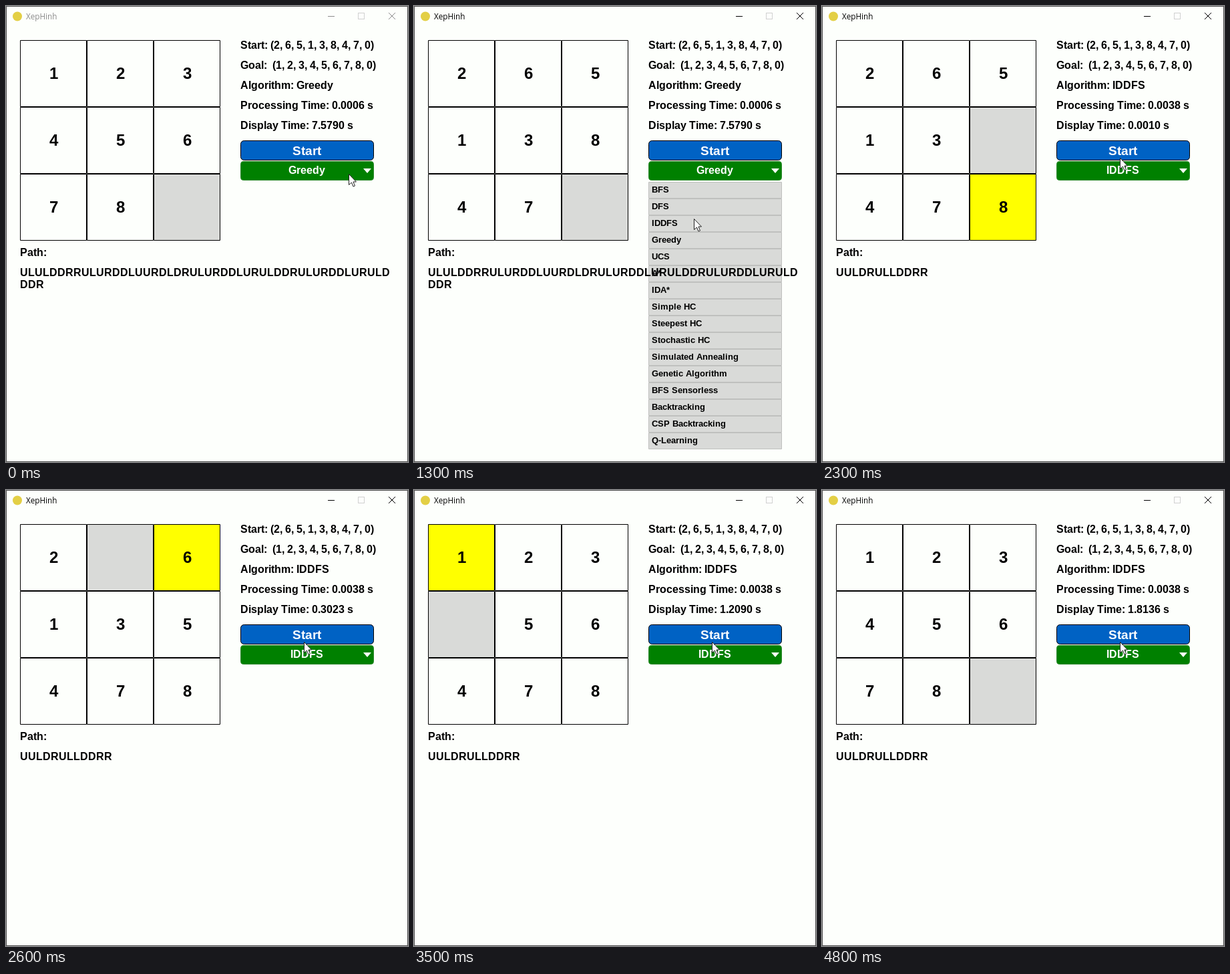
An HTML page with a canvas for the animation above (4900 ms loop, 602 px wide and 682 px high).

```html
<!DOCTYPE html>
<html lang="vi">
<head>
<meta charset="utf-8">
<title>XepHinh</title>
<style>
html, body { margin: 0; height: 100%; overflow: hidden; background: #fdfffc; }
canvas { display: block; }
</style>
</head>
<body>
<canvas id="stage" width="602" height="682"></canvas>
<script>
const ctx = document.getElementById('stage').getContext('2d');
const LOOP = 4900, TICK = 100;
const ACTIVE = 100, OPEN = 700, CHOSEN = 1600, SOLVE = 2170, STEP = 151;
const PAPER = '#fdfffc', GRAY = '#d9dad8';
const START = [2, 6, 5, 1, 3, 8, 4, 7, 0];
const GOAL = [1, 2, 3, 4, 5, 6, 7, 8, 0];
const PATH = 'UULDRULLDDRR';
const OLD_PATH = ['ULULDDRRULURDDLUURDLDRULURDDLURULDDRULURDDLURULD', 'DDR'];
const SHIFT = { U: -3, D: 3, L: -1, R: 1 };
const OPTIONS = ['BFS', 'DFS', 'IDDFS', 'Greedy', 'UCS', 'A*', 'IDA*', 'Simple HC',
  'Steepest HC', 'Stochastic HC', 'Simulated Annealing', 'Genetic Algorithm',
  'BFS Sensorless', 'Backtracking', 'CSP Backtracking', 'Q-Learning'];

// Bold text whose glyphs advance by whole pixels
function text(str, x, y, size = 16, color = '#000', centered = false) {
  ctx.font = `bold ${size}px "Liberation Sans", Arial, sans-serif`;
  ctx.fillStyle = color;
  const widths = [...str].map(c => Math.round(ctx.measureText(c).width));
  if (centered) x -= Math.round(widths.reduce((a, b) => a + b, 0) / 2);
  [...str].forEach((c, i) => {
    ctx.fillText(c, x, y);
    x += widths[i];
  });
}

function box(x, y, w, h, fill, line, radius = 0) {
  ctx.beginPath();
  ctx.roundRect(x + .5, y + .5, w - 1, h - 1, radius);
  ctx.fillStyle = fill;
  ctx.fill();
  ctx.strokeStyle = line;
  ctx.stroke();
}

function shape(points, fill, line) {
  ctx.beginPath();
  points.forEach(([x, y]) => ctx.lineTo(x, y));
  ctx.closePath();
  ctx.fillStyle = fill;
  ctx.fill();
  if (line) {
    ctx.strokeStyle = line;
    ctx.stroke();
  }
}

function frame(active) {
  box(0, 0, 602, 682, PAPER, '#4a4a4a');
  ctx.fillStyle = '#e3cf45';
  ctx.beginPath();
  ctx.arc(17, 15.5, 7, 0, 7);
  ctx.fill();
  const ink = active ? '#000' : '#8c8c8c';
  ctx.font = '11.7px "Open Sans", "Noto Sans", sans-serif';
  ctx.fillStyle = ink;
  ctx.fillText('XepHinh', 30, 20);
  ctx.fillRect(482, 15, 10, 1);
  ctx.strokeStyle = '#d0d0d0';
  ctx.strokeRect(527.5, 10.5, 9, 9);
  ctx.strokeStyle = ink;
  ctx.beginPath();
  ctx.moveTo(573, 10);
  ctx.lineTo(583, 20);
  ctx.moveTo(583, 10);
  ctx.lineTo(573, 20);
  ctx.stroke();
}

function board(tiles, lit) {
  tiles.forEach((n, i) => {
    const x = 21 + i % 3 * 100, y = 51 + Math.floor(i / 3) * 100;
    box(x, y, 100, 100, !n ? GRAY : i === lit ? '#ff0' : PAPER, '#000');
    if (n) text(String(n), x + 51, y + 58, 24, '#000', true);
  });
}

// Slides the blank along the first moves of the path
function solve(count) {
  const tiles = [...START];
  let blank = 8, lit = -1;
  for (const move of PATH.slice(0, count)) {
    lit = blank;
    blank += SHIFT[move];
    [tiles[lit], tiles[blank]] = [tiles[blank], 0];
  }
  return [tiles, count > PATH.length ? -1 : lit];
}

const pointer = [[700, 513, 251], [1400, 418, 319], [1600, 418, 319], [2100, 446, 227]];
function ease(p) {
  return p < .5 ? 4 * p ** 3 : 1 - 4 * (1 - p) ** 3;
}
function cursor(t) {
  let [, x, y] = pointer[0];
  for (let i = 1; i < pointer.length && t > pointer[i - 1][0]; i++) {
    const [t0, x0, y0] = pointer[i - 1], [t1, x1, y1] = pointer[i];
    const p = ease(Math.min(1, (t - t0) / (t1 - t0)));
    x = Math.round(x0 + (x1 - x0) * p);
    y = Math.round(y0 + (y1 - y0) * p);
  }
  const outline = [[0, 0], [0, 16], [4, 12.5], [6.5, 18.5], [9, 17.5], [6.5, 11.5], [11, 11.5]];
  shape(outline.map(([a, b]) => [x + a + .5, y + b + .5]), '#fff', '#222');
}

function draw(t) {
  const chosen = t >= CHOSEN, solving = t >= SOLVE;
  const name = chosen ? 'IDDFS' : 'Greedy';
  const step = solving ? Math.min(PATH.length, Math.floor((t - SOLVE) / STEP)) : 0;
  const shown = !chosen ? '7.5790' : !solving ? '0.0000'
    : step ? (step * .15113).toFixed(4) : '0.0010';
  const spent = !chosen ? '0.0006' : solving ? '0.0038' : '0.0000';

  frame(t >= ACTIVE);
  if (t < OPEN) board(GOAL);
  else board(...solve(solving ? step + 1 : 0));

  [`Start: (${START.join(', ')})`, `Goal:  (${GOAL.join(', ')})`, `Algorithm: ${name}`,
    `Processing Time: ${spent} s`, `Display Time: ${shown} s`]
    .forEach((line, i) => text(line, 351, 64 + i * 30));

  box(351, 201, 200, 30, '#0062c4', '#000', 5);
  text('Start', 451, 223, 19, '#fff', true);
  box(351, 232, 200, 29, '#008000', '#2c8a2c', 4);
  text(name, 451, 251, 16, '#fff', true);
  shape([[535, 243], [547, 243], [541, 250]], '#fff');

  if (t >= OPEN && !chosen) {
    OPTIONS.forEach((option, i) => {
      box(351, 263 + i * 25, 200, 25, GRAY, '#bfc0be');
      text(option, 356, 279 + i * 25, 13);
    });
  }
  text('Path:', 21, 374);
  const path = !chosen ? OLD_PATH : solving ? [PATH] : [];
  path.forEach((line, i) => text(line, 21, 404 + i * 18));
  cursor(t);
}

function tick() {
  const t = performance.now() % LOOP;
  draw(Math.floor(t / TICK) * TICK);
  requestAnimationFrame(tick);
}
tick();
</script>
</body>
</html>
```
